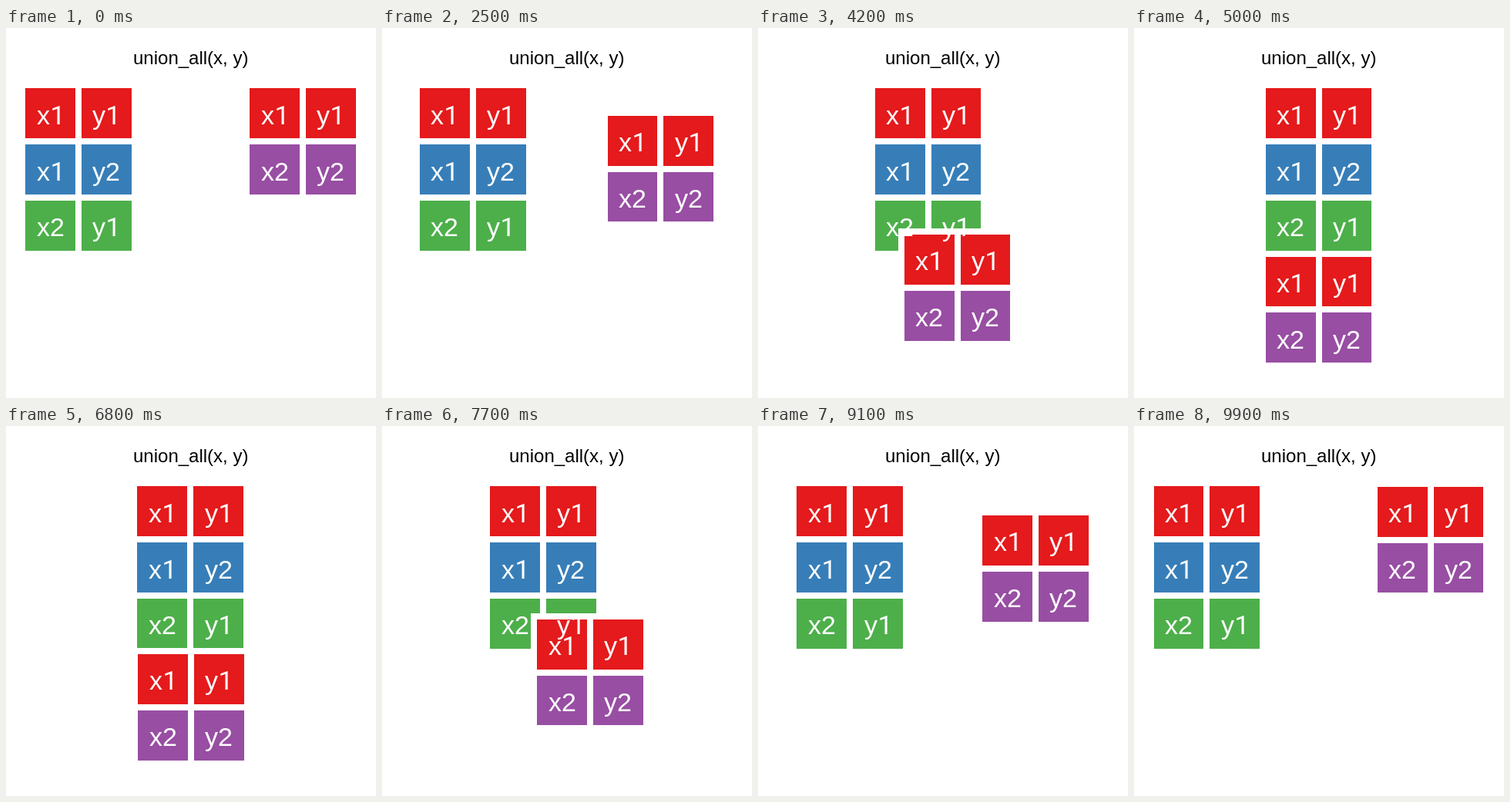
Animation of 480x480 px, one loop 10 s. Source, as an HTML page:

```html
<!DOCTYPE html>
<html lang="en">
<head>
<meta charset="utf-8">
<title>union_all(x, y)</title>
<style>
  html, body { margin: 0; width: 100%; height: 100%; overflow: hidden; background: #fff; }
  svg { display: block; width: 480px; height: 480px; }
  rect { stroke: #fff; stroke-width: 8; shape-rendering: crispEdges; }
  text { font-family: "Liberation Sans", Arial, sans-serif; white-space: pre; }
  .label { font-size: 34px; fill: #fff; }
  .one { font-family: Roboto, Arial, sans-serif; }  /* a 1 without a foot */
  .title { font-size: 24px; fill: #000; }
</style>
</head>
<body>
<svg id="stage" viewBox="0 0 480 480">
  <g id="tiles"></g>
  <g id="labels"></g>
  <text class="title" x="165" y="47">union_all(x, y)</text>
</svg>
<script>
const LOOP = 10000, STEP = 100;
const UNIT = 480 / 6.6;              // cell pitch
const LEFT = 21.35, TOP = 74.42;     // corner of the grid
const RED = '#e41a1c', BLUE = '#377eb8', GREEN = '#4daf4a', PURPLE = '#984ea3';

// Each table: grid column, shift in cells when joined, rows of [colour, x, y]
const tables = [
  { col: 0, dx: 2, dy: 0, rows: [[RED, 'x1', 'y1'], [BLUE, 'x1', 'y2'], [GREEN, 'x2', 'y1']] },
  { col: 4, dx: -2, dy: 3, rows: [[RED, 'x1', 'y1'], [PURPLE, 'x2', 'y2']] }
];

function add(parent, tag, attrs, text = '') {
  const el = document.createElementNS('http://www.w3.org/2000/svg', tag);
  setAttrs(el, attrs);
  el.textContent = text;
  return parent.appendChild(el);
}

function setAttrs(el, attrs) {
  for (const key in attrs) el.setAttribute(key, attrs[key]);
}

const tileLayer = document.getElementById('tiles');
const labelLayer = document.getElementById('labels');
const cells = [];

for (const { col, dx, dy, rows } of tables) {
  rows.forEach(([fill, ...names], row) => names.forEach((name, i) => {
    const rect = add(tileLayer, 'rect', { fill });
    const label = add(labelLayer, 'text', { class: 'label' }, name[0]);
    const one = name[1] === '1';
    add(label, 'tspan', one ? { class: 'one', dx: 0.6 } : {}, name[1]);
    cells.push({ rect, label, col: col + i, row, dx, dy });
  }));
}

const sineInOut = u => (1 - Math.cos(Math.PI * Math.min(1, Math.max(0, u)))) / 2;

// 0 = apart, 1 = joined
function joined(t) {
  return t < 6700 ? sineInOut((t - 1600) / 3400) : 1 - sineInOut((t - 6700) / 3300);
}

function draw(t) {
  const p = joined(t);
  for (const c of cells) {
    const x = LEFT + (c.col + c.dx * p) * UNIT;
    const y = TOP + (c.row + c.dy * p) * UNIT;
    const x0 = Math.round(x), y0 = Math.round(y);
    setAttrs(c.rect, {
      x: x0, y: y0,
      width: Math.round(x + UNIT) - x0,
      height: Math.round(y + UNIT) - y0
    });
    setAttrs(c.label, {
      x: Math.round(x + UNIT / 2 - 17.95),
      y: Math.round(y + UNIT / 2 + 14)
    });
  }
}

let last = -1;
function tick() {
  const t = Math.floor(performance.now() % LOOP / STEP) * STEP;
  if (t !== last) draw(last = t);
  requestAnimationFrame(tick);
}
tick();
</script>
</body>
</html>
```
